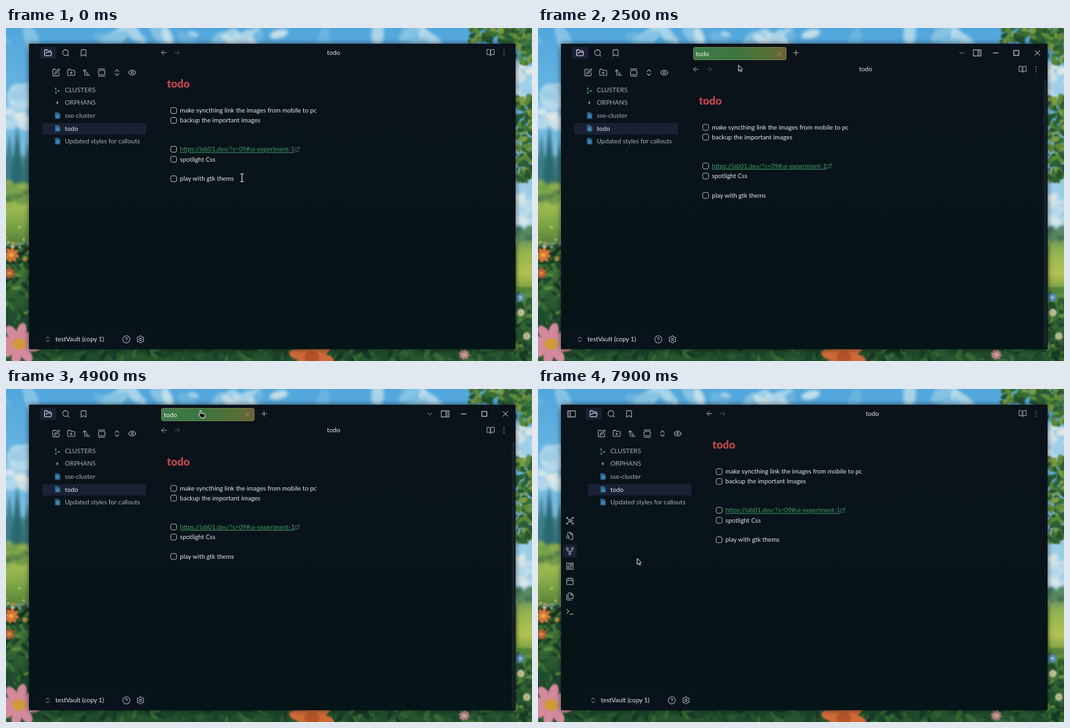
Write an HTML page with a canvas that moves like this. It is 800 px wide and 508 px high and loops after 8 s.

```html
<!DOCTYPE html>
<html lang="en">
<head>
<meta charset="utf-8">
<title>Notes window</title>
<style>
/* h: tab bar height, r: ribbon shift, o: tab bar opacity, v: tab hover */
@property --h { syntax: "<number>"; inherits: true; initial-value: 0; }
@property --r { syntax: "<number>"; inherits: true; initial-value: 0; }
@property --o { syntax: "<number>"; inherits: true; initial-value: 0; }
@property --v { syntax: "<number>"; inherits: true; initial-value: 1; }

html, body { margin: 0; width: 800px; height: 508px; overflow: hidden; background: #17331d; }
#stage {
  position: relative; width: 800px; height: 508px; overflow: hidden;
  font: 9.8px Lato, "Open Sans", sans-serif;
  animation: 8s cubic-bezier(.68, -.55, .265, 1.55) infinite;
  animation-name: bar, ribbon, fade, hover;
}
#stage > * { position: absolute; }
canvas, #ui { left: 0; top: 0; }

@keyframes bar {
  0%, 11.9% { --h: 0; }
  16.9%, 38.85% { --h: 25.5; }
  43.85%, 48.94% { --h: 0; }
  53.94%, 68.76% { --h: 25.5; }
  73.76%, 100% { --h: 0; }
}
@keyframes ribbon {
  0%, 85% { --r: 0; }
  90%, 100% { --r: 20.5; }
}
@keyframes fade {
  0%, 12% { --o: 0; animation-timing-function: linear; }
  15.5%, 38.85% { --o: 1; animation-timing-function: ease-in-out; }
  42.6%, 48.94% { --o: 0; animation-timing-function: linear; }
  52%, 68.76% { --o: 1; animation-timing-function: ease-in-out; }
  72.5%, 100% { --o: 0; }
}
@keyframes hover {
  0%, 32% { --v: 1; animation-timing-function: ease; }
  35%, 47% { --v: 0; animation-timing-function: ease; }
  49%, 63% { --v: 1; animation-timing-function: ease; }
  66%, 100% { --v: 0; }
}

#win {
  left: 35px; top: 24px; width: 740px; height: 466px;
  background: linear-gradient(#0b121a, #08131a 45%, #041417);
  box-shadow: 0 0 8px rgba(0, 8, 14, .65);
}
.side { transform: translateX(calc(max(0, var(--r)) * 1px)); }
.main { transform: translate(calc(max(0, var(--r)) * 1px), calc(max(0, var(--h)) * 1px)); }
.name { transform: translate(calc(max(0, var(--r)) * .5px), calc(max(0, var(--h)) * 1px)); }
.head { transform: translateY(calc(max(0, var(--h)) * 1px)); }
.mid { transform: translateY(calc(max(0, var(--h)) * .5px)); }
.ctl { transform: translateY(calc(min(10, max(0, var(--h)) * .4) * 1px)); }
.mid, .ctl, .fix { opacity: var(--o); }
.rib { opacity: calc(var(--r) / 20.5); }
.main { font-size: 9.65px; }
.icon { fill: none; stroke: currentColor; stroke-linecap: round; stroke-linejoin: round; }

#tab {
  left: 236px; top: 29px; width: 142px; height: calc(max(0, var(--h) - 6) * 1px);
  box-sizing: border-box; padding: 0 6px 0 4px; overflow: hidden; border-radius: 4px;
  display: flex; align-items: center; justify-content: space-between;
  color: #f4f6ee; opacity: var(--o);
  background: linear-gradient(90deg, #3f7a4a, #3c7541 45%, #557036 80%, #6c603a);
  box-shadow: inset 0 0 0 1px rgba(180, 145, 90, .4);
  filter: brightness(calc(.62 + .38 * var(--v)));
}
#tab svg { flex: none; }

#cur { left: 0; top: 0; animation: move 8s linear infinite; }
#cur svg { position: absolute; left: -10px; top: -10px; visibility: hidden; animation: 8s step-end infinite; }
#cur .beam { animation-name: beam; }
#cur .hand { animation-name: hand; }
#cur .arrow { animation-name: arrow; }
@keyframes move {
  0%, 1.2% { transform: translate(359px, 228px); }
  7.5%, 12.6% { transform: translate(331px, 84px); }
  14.5%, 24.5% { transform: translate(315px, 32px); }
  26.2%, 29% { transform: translate(308px, 33px); }
  37.5%, 47.5% { transform: translate(295px, 120px); }
  50%, 61.5% { transform: translate(296px, 33px); }
  66.2%, 71.5% { transform: translate(234px, 216px); }
  80% { transform: translate(62px, 244px); }
  82.5%, 86.5% { transform: translate(26px, 247px); }
  96.2% { transform: translate(33px, 247px); }
  98.6%, 100% { transform: translate(150.500px, 258px); }
}
@keyframes beam { 0% { visibility: visible; } 13.6%, 100% { visibility: hidden; } }
@keyframes hand {
  0% { visibility: hidden; } 13.6% { visibility: visible; }
  31% { visibility: hidden; } 49.6% { visibility: visible; }
  62.4%, 100% { visibility: hidden; }
}
@keyframes arrow {
  0% { visibility: hidden; } 31% { visibility: visible; }
  49.6% { visibility: hidden; } 62.4%, 100% { visibility: visible; }
}
</style>
</head>
<body>
<div id="stage">
  <canvas width="800" height="508"></canvas>
  <div id="win"></div>
  <svg id="ui" width="800" height="508"></svg>
  <div id="tab"><span>todo</span></div>
  <div id="cur">
    <svg class="beam" width="20" height="20"><path d="M7.5 4.5h2l.5.6.5-.6h2M10 5v11M7.5 16.3h2l.5-.6.5.6h2" fill="none" stroke="#d6dbe0" stroke-width="1.2"/></svg>
    <svg class="hand" width="24" height="26"><path d="M9 16V10.500q1-1.500 2 0V14l5 1q1 .5 1 2l-1 4h-5l-4-4.500q0-1.500 2-.5z" fill="#0a0e12" stroke="#fff" stroke-linejoin="round"/></svg>
    <svg class="arrow" width="24" height="26"><path d="M10.500 10.500v9l2-1.700 1.500 3 1.500-.8-1.400-2.800 2.400-.400z" fill="#07090c" stroke="#e8ecef" stroke-linejoin="round"/></svg>
  </div>
</div>
<script>
// ---- interface ----
const round = (x, y, r) => `M${x - r} ${y}a${r} ${r} 0 1 0 ${2 * r} 0a${r} ${r} 0 1 0 ${-2 * r} 0`;
const gear = () => 'M' + Array.from({ length: 49 }, (_, i) => {
  const a = i * Math.PI / 24, r = 9 + 1.4 * Math.cos(6 * a);
  return (12 + r * Math.sin(a)).toFixed(1) + ' ' + (12 - r * Math.cos(a)).toFixed(1);
}).join('L') + 'z';

const ICONS = {
  folder: 'm6 14 1.5-2.9A2 2 0 0 1 9.2 10H20a2 2 0 0 1 2 2.5l-1.6 6a2 2 0 0 1-1.900 1.500H4a2 2 0 0 1-2-2V5a2 2 0 0 1 2-2h3.900a2 2 0 0 1 1.700.900l.800 1.200a2 2 0 0 0 1.700.900H18a2 2 0 0 1 2 2v2',
  search: round(11, 11, 8) + 'M21 21l-4.3-4.3',
  bookmark: 'm19 21-7-4-7 4V5a2 2 0 0 1 2-2h10a2 2 0 0 1 2 2z',
  edit: 'M12 3H5a2 2 0 0 0-2 2v14a2 2 0 0 0 2 2h14a2 2 0 0 0 2-2v-7M18.4 2.6a2.1 2.1 0 0 1 3 3L12 15l-4 1 1-4Z',
  newFolder: 'M12 10v6M9 13h6M20 20a2 2 0 0 0 2-2V8a2 2 0 0 0-2-2h-8L9.600 3H4a2 2 0 0 0-2 2v13a2 2 0 0 0 2 2Z',
  sort: 'm3 8 4-4 4 4M7 4v16M11 12h4M11 16h7M11 20h10',
  gallery: 'M3 2h18M5 6h14a2 2 0 0 1 2 2v8a2 2 0 0 1-2 2H5a2 2 0 0 1-2-2V8a2 2 0 0 1 2-2zM3 22h18',
  updown: 'm7 15 5 5 5-5M7 9l5-5 5 5',
  eye: 'M2 12s3-7 10-7 10 7 10 7-3 7-10 7-10-7-10-7z' + round(12, 12, 3),
  help: round(12, 12, 10) + 'M9.1 9a3 3 0 0 1 5.8 1c0 2-3 3-3 3M12 17h.01',
  gear: gear() + round(12, 12, 3),
  book: 'M2 3h6a4 4 0 0 1 4 4v14a3 3 0 0 0-3-3H2zM22 3h-6a4 4 0 0 0-4 4v14a3 3 0 0 1 3-3h7z',
  dots: [4, 12, 20].map(y => round(12, y, .8)).join(''),
  left: 'm12 19-7-7 7-7M20 12H5',
  right: 'm12 5 7 7-7 7M4 12h15',
  link: 'M15 3h6v6M10 14 21 3M18 13v6a2 2 0 0 1-2 2H5a2 2 0 0 1-2-2V8a2 2 0 0 1 2-2h6',
  plus: 'M4 12h16M12 4v16',
  down: 'm5 9 7 7 7-7',
  min: 'M5 12h14',
  max: 'M5 5h14v14H5z',
  close: 'M5 5l14 14M19 5 5 19',
  panelR: 'M2 4h20v16H2zM14 4v16M17 8h2M17 12h2M17 16h2',
  panelL: 'M2 4h20v16H2zM9 4v16M5 8h1M5 12h1M5 16h1',
  graph: round(12, 12, 3) + [[4, 4], [20, 4], [4, 20], [20, 20]].map(([x, y]) => round(x, y, 1.6)).join('')
    + 'M5 5l5 5M19 5l-5 5M5 19l5-5M19 19l-5-5M15 12h6',
  find: 'M14 2H8a2 2 0 0 0-2 2v4M14 2l6 6v12a2 2 0 0 1-2 2h-5M14 2v6h6M10 20l-2-2' + round(6, 15, 3.5),
  fork: round(12, 19, 3) + round(5, 5, 3) + round(19, 5, 3) + 'M5 8v2q0 2 2 2h10q2 0 2-2V8M12 12v4',
  board: 'M3 3h7v9H3zM14 3h7v5h-7zM14 12h7v9h-7zM3 16h7v5H3z',
  calendar: 'M5 4h14a2 2 0 0 1 2 2v13a2 2 0 0 1-2 2H5a2 2 0 0 1-2-2V6a2 2 0 0 1 2-2zM3 10h18M8 2v4M16 2v4',
  files: 'M15 2H9a2 2 0 0 0-2 2v12a2 2 0 0 0 2 2h10a2 2 0 0 0 2-2V8zM15 2v6h6M3 7v13a2 2 0 0 0 2 2h11',
  term: 'm3 17 6-6-6-6M12 19h9',
};
const icon = (name, x, y, size = 13, color = '#a4adb6') =>
  `<svg class="icon" x="${x - size / 2}" y="${y - size / 2}" width="${size}" height="${size}" viewBox="0 0 24 24" color="${color}" stroke-width="1.9"><path d="${ICONS[name]}"/></svg>`;
const text = (s, x, y, fill, more = '') => `<text x="${x}" y="${y + 3.4}" fill="${fill}" ${more}>${s}</text>`;
const box = (x, y, w, h, fill, r = 2) => `<rect x="${x}" y="${y}" width="${w}" height="${h}" rx="${r}" fill="${fill}"/>`;
const group = (cls, ...parts) => `<g class="${cls}">${parts.join('')}</g>`;

const MUTED = '#a7b0b9', BRIGHT = '#e2e7eb', PICK = '#1b2034';
const doc = y => `<path d="M74.500 ${y - 5}h5l3 3v7h-8z" fill="#28648f"/><path d="M76 ${y}h5m-5 2.500h5" stroke="#86b8d8" stroke-width=".8"/>`;
const task = (y, s) => `<rect x="250.500" y="${y - 4.5}" width="9" height="9" rx="2.500" fill="none" stroke="#a4adb6"/>` + s;
const URL_TEXT = 'https://lab01.dev/?s=09#ui-experiment-1';

document.getElementById('ui').innerHTML = [
  group('rib', icon('panelL', 51, 38, 14),
    box(38, 237, 21, 20, PICK),
    ...['graph', 'find', 'fork', 'board', 'calendar', 'files', 'term'].map((n, i) => icon(n, 48.5, 201 + i * 23.1))),
  group('side',
    box(52, 29, 24.5, 18, PICK), icon('folder', 64, 38, 13, BRIGHT), icon('search', 91, 38), icon('bookmark', 118, 38),
    ...['edit', 'newFolder', 'sort', 'gallery', 'updown', 'eye'].map((n, i) => icon(n, 76 + i * 23.2, 68)),
    box(55, 145, 158, 17.5, PICK),
    '<path d="M75.500 92v7M76 96h4" fill="none" stroke="#3f5c66" stroke-width=".8"/><path d="M74.500 92h2M79 96h2.500M75 99h2" stroke="#58a797" stroke-width="1.800"/>',
    '<path d="M78 111l1.800 3-1.800 3-1.800-3z" fill="#86568f"/><circle cx="78" cy="114" r=".9" fill="#d9a3c0"/>',
    doc(133.5), doc(153), doc(172.5),
    ...['CLUSTERS', 'ORPHANS', 'sse-cluster', 'todo', 'Updated styles for callouts']
      .map((s, i) => text(s, 89.5, 94.3 + i * 19.6, i == 3 ? BRIGHT : MUTED)),
    box(45, 461, 176, 27, '#0a131b', 4),
    icon('updown', 63.5, 475, 11.5), text('testVault (copy 1)', 75, 474.5, BRIGHT),
    icon('help', 183, 475), icon('gear', 204.5, 475)),
  group('name', text('todo', 498.3, 37.5, BRIGHT, 'text-anchor="middle"')),
  group('main',
    icon('left', 240, 37.5, 12), icon('right', 260.5, 37.5, 12, '#4c555e'),
    text('todo', 244.7, 88, '#bd444c', 'font-size="16.500" font-weight="900"'),
    task(126, text('make syncthing link the images from mobile to pc', 264.5, 126, BRIGHT)),
    task(141, text('backup the important images', 264.5, 141, BRIGHT)),
    task(185, text(URL_TEXT, 264.5, 185, '#419c68', 'text-decoration="underline"')),
    icon('link', 443, 185, 8.5, '#6d9583'),
    task(200.3, text('spotlight Css', 264.5, 200.3, BRIGHT)),
    task(230, text('play with gtk thems', 264.5, 230, BRIGHT))),
  group('head', icon('book', 737, 37.5, 12.5), icon('dots', 757.5, 37.5, 11.5),
    '<g class="fix">' + box(769, 55, 5, 407, '#172028', 1) + '</g>'),
  group('mid', icon('plus', 392.5, 25, 12), icon('down', 644.5, 25, 11)),
  group('fix', icon('panelR', 668, 38, 14)),
  group('ctl', icon('min', 696, 28, 13, BRIGHT), icon('max', 727.5, 28, 13, BRIGHT), icon('close', 759.5, 28, 12, BRIGHT)),
].join('');
document.getElementById('tab').insertAdjacentHTML('beforeend', icon('close', 0, 0, 10, '#c98a58'));

// ---- painted meadow behind the window ----
const c = document.querySelector('canvas').getContext('2d');
let seed = 7;
const rand = () => (seed = seed * 16807 % 2147483647) / 2147483647;

function ramp(x, y, w, h, ...colors) {
  const g = c.createLinearGradient(0, y, 0, y + h);
  colors.forEach((col, i) => g.addColorStop(i / (colors.length - 1), col));
  c.fillStyle = g;
  c.fillRect(x, y, w, h);
}
function oval(x, y, rx, ry, turn, color) {
  c.fillStyle = color;
  c.beginPath();
  c.ellipse(x, y, rx, ry, turn, 0, 7);
  c.fill();
}
function scatter(n, x, y, w, h, size, flat, colors) {
  for (let i = 0; i < n; i++) {
    const r = size * (.5 + rand());
    oval(x + rand() * w, y + rand() * h, r, r * flat, flat < .6 ? rand() * 3.14 : 0, colors[i % colors.length]);
  }
}
function flower(x, y, r, petal, heart) {
  for (let i = 0; i < 8; i++) {
    const a = i * Math.PI / 4 + .2;
    oval(x + Math.cos(a) * r * .6, y + Math.sin(a) * r * .6, r * .45, r * .25, a, petal);
  }
  oval(x, y, r * .34, r * .28, 0, heart);
}
function pine(x, top, w, bottom, color) {
  c.fillStyle = color;
  c.beginPath();
  c.moveTo(x, top);
  c.lineTo(x + w, bottom);
  c.lineTo(x - w, bottom);
  c.fill();
}

const cloud = ['#cfe4ec', '#b3d8ea', '#e0e8e6', '#9dcde8'];
const tree = ['#24522f', '#3a6f30', '#5c8b38', '#2c5f38', '#7f9c42'];
const grass = ['#1c4429', '#28582f', '#173725', '#386a35', '#204c2d'];

// distant scenery, softly blurred
c.filter = 'blur(2.5px)';
ramp(-9, -9, 818, 340, '#4fa5dc', '#74bde4', '#b9dcea');
scatter(30, 0, 6, 700, 22, 15, .45, ['#85c3e4', '#a9d4e8', '#6bb4e0', '#c3dfe8']);
scatter(22, 0, 92, 36, 55, 10, .7, cloud);
scatter(24, 775, 55, 25, 50, 9, .7, cloud);
scatter(20, 775, 238, 25, 60, 9, .7, cloud);
ramp(-9, 196, 46, 50, '#4f8f95', '#3f7a6c');
pine(5, 160, 12, 238, '#3d7f8a');
pine(17, 148, 11, 238, '#2b6873');
pine(33, 172, 10, 238, '#34737a');
ramp(-9, 238, 46, 92, '#6c9c48', '#a6bd54', '#7ba645', '#557f38');
scatter(16, 0, 234, 36, 40, 6, .6, ['#517f48', '#73a04a', '#8fb050']);
ramp(774, 308, 36, 100, '#4f8064', '#95b450', '#b3c254', '#648f3c');
scatter(12, 775, 306, 25, 18, 5, .8, ['#42735b', '#568a60']);

// foliage and flowers
c.filter = 'blur(.8px)';
scatter(75, 708, -3, 82, 26, 6, .5, tree);
scatter(45, 775, 0, 25, 55, 6, .5, tree);
scatter(110, 774, 108, 28, 124, 6, .5, tree);
ramp(0, 360, 36, 148, '#4a7c38', '#24502f', '#173725');
ramp(0, 488, 800, 20, '#1c4429', '#2a5a30');
ramp(774, 395, 26, 113, '#55863a', '#24502f');
scatter(80, 0, 325, 36, 180, 7, .35, grass.concat('#5d8c3f'));
scatter(200, 0, 488, 800, 22, 9, .35, grass);
scatter(60, 774, 405, 28, 103, 7, .35, grass.concat('#5d8c3f'));
scatter(8, 0, 300, 34, 35, 2, .8, ['#d9cf74', '#dde0bd', '#d98f4a']);

flower(8, 346, 11, '#e2793a', '#eeae4c');
flower(5, 374, 8, '#cf6238', '#e0a04a');
flower(29, 352, 4, '#dfb052', '#d97f38');
flower(20, 482, 31, '#d48a9c', '#cf9a38');
flower(465, 502, 33, '#cf6a38', '#b4532a');
flower(697, 498, 8, '#c98a9d', '#e0c070');
flower(782, 411, 7, '#5a93cc', '#c3d8e6');
flower(783, 434, 6, '#dfe0c4', '#d9b84a');
flower(792, 470, 6, '#d6d8b8', '#cfa943');
</script>
</body>
</html>
```
